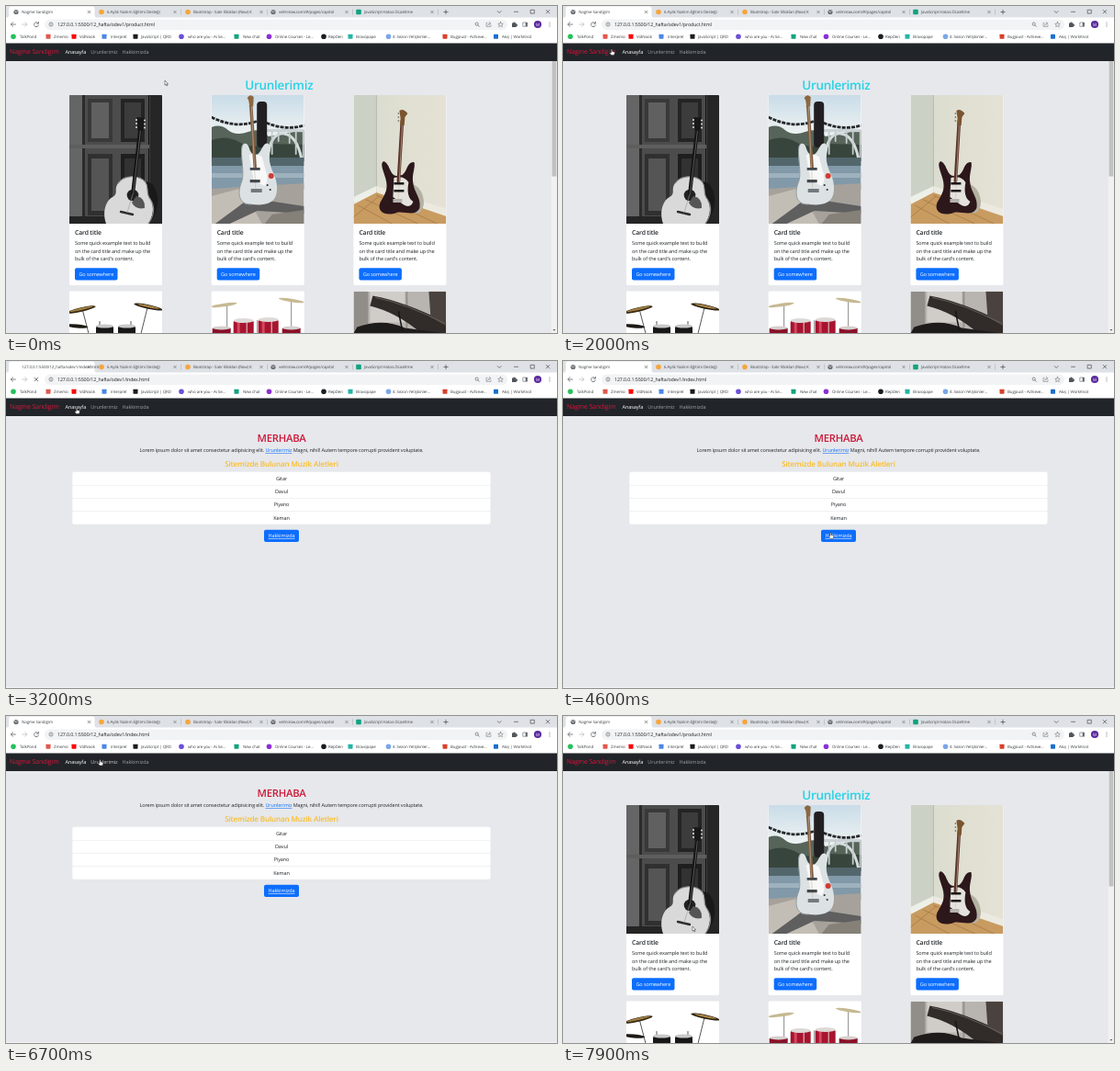
An HTML page that plays this animation: 600 by 356 pixels, repeating every 8 s.

```html
<!DOCTYPE html>
<html lang="tr">
<head>
<meta charset="utf-8">
<title>Nagme Sandigim</title>
<style>
  html, body { margin: 0; width: 100%; height: 100%; overflow: hidden; }
  svg.stage { display: block; width: 100vw; height: 100vh; }
  svg svg { overflow: visible; }
  text {
    font-family: "Open Sans", "Noto Sans", sans-serif;
    letter-spacing: -.02em;
    text-rendering: geometricPrecision;
    white-space: pre;
  }
</style>
</head>
<body>
<script>
const LOOP = 8000, STEP = 100;
const BLUE = '#0d6efd', INK = '#212529';

const rect = (x, y, w, h, fill, r = 0) =>
  `<rect x="${x}" y="${y}" width="${w}" height="${h}" fill="${fill}" rx="${r}"/>`;
const dot = (x, y, r, fill) => `<circle cx="${x}" cy="${y}" r="${r}" fill="${fill}"/>`;
const oval = (x, y, rx, ry, fill, turn = 0) =>
  `<ellipse cx="${x}" cy="${y}" rx="${rx}" ry="${ry}" fill="${fill}" transform="rotate(${turn} ${x} ${y})"/>`;
const shape = (d, fill) => `<path d="${d}" fill="${fill}"/>`;
const line = (d, color = '#5f6368', w = .7) =>
  `<path d="${d}" fill="none" stroke="${color}" stroke-width="${w}" stroke-linecap="round" stroke-linejoin="round"/>`;
const text = (x, y, size, str, fill = INK, more = '') =>
  `<text x="${x}" y="${y}" font-size="${size}" fill="${fill}" ${more}>${str}</text>`;
const group = (id, body) => `<g id="${id}">${body}</g>`;
const MID = 'text-anchor="middle"', BOLD = 'font-weight="600"';

const cross = (x, y, r, color, w) =>
  line(`M${x - r} ${y - r}L${x + r} ${y + r}M${x + r} ${y - r}L${x - r} ${y + r}`, color, w);
const globe = (x, y) => dot(x, y, 2.6, '#5f6368') +
  line(`M${x - 1.6} ${y - .9}l1.5 .5l.2 1.5M${x + .6} ${y - 1.7}l1.2 1.4`, '#fff', .6);

function browser() {
  const tabs = [
    [104, '6 Aylık Yazılım Eğitimi Desteği', dot(104, 6.5, 2.8, '#f6a63c')],
    [198, 'Bootstrap - Satır Blokları (Row) K', dot(198, 6.5, 2.8, '#f6a63c')],
    [291, 'velmirow.com/#/pages/capitol', globe(291, 6.5)],
    [384, 'JavaScript Hatası Düzeltme', rect(381.2, 3.7, 5.6, 5.6, '#10a37f', 1)],
  ];
  const marks = [
    [8, 15, 'TalkPond', '#25c15c'], [46, 52, 'Zmemo', '#e2574c', 1], [74, 80, 'VidNook', '#f00', 1],
    [107, 114, 'Interpret', '#4a86e8', 1], [141, 147, 'JavaScript | QRD', '#1b1b1b', 1],
    [191, 198, 'who are you - Ai Se...', '#6c4fd8'], [251, 258, 'New chat', '#10a37f', 1],
    [286.5, 293, 'Online Courses - Le...', '#8b2fd6'], [346, 351, 'RepDen', '#1b1f23'],
    [375, 381, 'Bravopape', '#24b5a5', 1], [416.5, 421, '4. Sezon Yetişkinler...', '#7aa7e8'],
    [478, 484, 'Bugjoust - Achieve...', '#d8402b', 1], [533.5, 540, 'Akış | WorkKnot', '#1a6fd0', 1],
  ];
  let s = rect(0, 0, 600, 13, '#dee1e6') +
    shape('M1 13Q3 12.5 3 10V3Q3 .5 5.5 .5H94Q96.5 .5 96.5 3V10Q96.5 12.5 98.5 13Z', '#fff') +
    rect(0, 12.5, 600, 28, '#fff') + rect(42, 14.5, 504, 11.5, '#f1f3f4', 5.7);
  s += group('favicon', globe(11, 6.5)) + text(17, 8.4, 4.45, '', '#3c4043', 'id="tabTitle"') +
    cross(90.5, 6.5, 1.3, '#45494d', .6);
  for (const [x, title, icon] of tabs)
    s += icon + text(x + 6, 8.4, 4.45, title, '#45494d') +
      cross(x + 80, 6.5, 1.3, '#5f6368', .6) + rect(x + 86, 3.5, .5, 6, '#a4a8ad');
  s += line('M476.8 6.5h4.4M479 4.3v4.4', '#45494d') +
    line('M535.3 5.6l1.9 1.9l1.9-1.9M553.5 6.3h4', '#333', .6) +
    line('M571.5 4.3h3.8v3.8h-3.8z', '#333', .6) + cross(590, 6.2, 1.8, '#333', .6);

  s += line('M10.4 20h-5M7.6 17.8L5.3 20l2.3 2.2', '#5f6368', .8) +
    line('M17.8 20h5M20.6 17.8l2.3 2.2l-2.3 2.2', '#bcc0c4', .8) +
    group('reload', line('M35.2 18.8A2.5 2.5 0 1 0 35.5 20.9M35.4 17.2v1.9h-1.9', '#5f6368', .8)) +
    group('stop', cross(33, 20, 1.9, '#5f6368', .8)) +
    `<circle cx="49" cy="20" r="2.1" fill="none" stroke="#5f6368" stroke-width=".6"/>` +
    line('M49 19.9v1M49 18.9v.05', '#5f6368', .6) +
    text(56, 22, 5.3, '', '#202124', 'id="url"');
  s += `<circle cx="512.7" cy="19.6" r="1.6" fill="none" stroke="#5f6368" stroke-width=".7"/>` +
    line('M514 20.9l1.4 1.4') +
    line('M524 18.3h-1v4h5v-1.5M524.5 21q.4-2.2 3-2.2M526.2 17.3l1.5 1.5l-1.5 1.5', '#5f6368', .5) +
    line('M538.5 17.3l.8 1.9l2 .2l-1.5 1.3l.5 2l-1.8-1.1l-1.8 1.1l.5-2l-1.5-1.3l2-.2z', '#5f6368', .5) +
    shape('M551 18.4h1.4a1 1 0 1 1 2 0h1.3v1.5a1 1 0 1 1 0 1.9v1.2h-4.7z', '#50555a') +
    line('M563.2 18h4.4v4.2h-4.4z', '#5f6368', .6) + rect(565.7, 18, 1.9, 4.2, '#5f6368') +
    dot(579, 20, 4.1, '#5b2a9d') + text(579, 21.6, 4.4, 'M', '#fff', MID) +
    [18, 20, 22].map(y => dot(592, y, .55, '#5f6368')).join('');

  for (const [ix, tx, label, color, square] of marks)
    s += (square ? rect(ix - 2.5, 30.7, 5, 5, color, .6) : dot(ix, 33.2, 2.8, color)) +
      text(tx, 34.9, 4.45, label, '#3c4043');
  return s;
}

function navbar() {
  return rect(0, 40, 600, 20, INK) + text(4, 52.4, 7, 'Nagme Sandigim', '#dc143c') +
    text(64.5, 52, 5.55, 'Anasayfa', '#fff') +
    text(92.3, 52, 5.55, 'Urunlerimiz', '#9b9d9f', 'id="shopLink"') +
    text(126.5, 52, 5.55, 'Hakkimizda', '#9b9d9f');
}

// Pictures are drawn in a 101 x 140 box.
const acoustic = () =>
  rect(0, 0, 101, 140, '#4c4c4c') + rect(0, 0, 14, 140, '#656565') + rect(14, 0, 3, 140, '#2b2b2b') +
  rect(20, 4, 27, 47, '#393939') + rect(24, 8, 19, 39, '#606060') +
  rect(56, 4, 26, 47, '#242424') + rect(60, 8, 18, 39, '#3c3c3c') +
  rect(20, 64, 27, 67, '#303030') + rect(24, 69, 19, 57, '#555') +
  rect(56, 64, 26, 76, '#1e1e1e') + rect(60, 69, 18, 66, '#323232') +
  rect(88, 0, 13, 140, '#262626') + rect(86, 0, 1.2, 140, '#111') + rect(0, 54, 87, 4, '#5e5e5e') +
  rect(0, 132, 101, 8, '#252525') + oval(81, 118, 15, 24, '#191919', 8) +
  shape('M53 96C60 86 77 87 83 95C87 101 83 107 88 113C95 124 88 139 83 144H42C35 132 38 116 47 111C54 107 48 103 53 96Z', '#d9d9d9') +
  line('M53 96C60 86 77 87 83 95C87 101 83 107 88 113C95 124 91 133 86 140', '#858585', 1.1) +
  dot(69, 109, 6.3, '#212121') + shape('M73 110q10 2 9 13q-10 2-14-6z', '#555') +
  line('M77 38L69 108', '#151515', 4) + line('M77.5 38L69.5 108', '#747474', .7) +
  shape('M73.5 24l8.5 .6l-2 14.5l-5.5-.4z', '#181818') +
  [27, 31, 35].map(y => dot(73, y, 1, '#ddd') + dot(82, y + .5, 1, '#ddd')).join('') +
  line('M56 127l13 3', '#2d2d2d', 2.4) + line('M69 108L63 128', '#999', .6);

const electric = () =>
  rect(0, 0, 101, 70, 'url(#sky)') +
  shape('M0 35Q10 31 18 38T40 40T62 45L101 38V72H0Z', '#56645a') +
  shape('M0 49Q16 43 30 51T64 53L101 54V72H0Z', '#37453c') +
  rect(58, 37, 43, 3.2, '#c9d1d4') + line('M61 68Q65 40 79 42T98 69', '#d5dcdd', 3) +
  line('M66 40v24M73 40v10M85 40v12M92 40v24M100 40v28', '#c4cccd', 1.8) +
  rect(0, 68, 101, 35, '#8199a8') + rect(0, 68, 101, 9, '#52666c') + rect(0, 85, 101, 5, '#9eb2be') +
  shape('M0 102L101 96V140H0Z', '#a6a29b') + shape('M0 110L34 101L55 140H0Z', '#c3beb5') +
  shape('M42 112L101 121V129L50 126L20 140H4Z', '#5f5f60') + shape('M66 130L101 125V140H58Z', '#858078') +
  `<path d="M0 24Q28 38 53 27Q78 40 101 33" fill="none" stroke="#26282b" stroke-width="2.8" stroke-dasharray="4 1.2"/>` +
  rect(49.5, 7, 11, 50, '#211f21', 4) +
  shape('M35 53C42 51 40 61 45 64L49 65C55 63 56 50 62 53C67 57 61 66 64 75C66 85 73 91 71 106C69 120 55 120 44 119C29 120 28 106 33 94C37 83 29 57 35 53Z', '#dce2e4') +
  line('M35 53C29 57 37 83 33 94C28 106 29 120 44 119', '#8f989c', 1) +
  shape('M41 65q8-2 14 2l4 15q4 10-1 17l-12-6z', '#f7f8f7') +
  line('M43 11L47.5 79', '#805d40', 3.5) + line('M43.5 11L48 101', '#c9bda9', .6) +
  shape('M39 3q3-5 7-1l-.5 10l-4.5 1q1-6-2-10z', '#8d673f') + rect(42, 79, 11, 2.8, '#44494c') +
  rect(42, 92, 11, 3.2, '#44494c') + rect(43, 102, 12, 4, '#737a7d') +
  dot(65, 88, 3, '#d13b32') + dot(61, 98, 1.1, '#333') + dot(64, 103, 1.1, '#333');

const wallGuitar = () =>
  rect(0, 0, 101, 140, 'url(#wall)') + shape('M0 0H25V104L0 116Z', '#cbd1c5') + rect(24.5, 0, .8, 104, '#aeb5a7') +
  shape('M0 116L25 104L101 131V140H0Z', '#c89b61') +
  shape('M0 111L25 99V106L0 119Z', '#edf0e9') + shape('M25 99L101 124V132L25 106Z', '#eceae0') +
  line('M5 120L42 140M14 114L70 140M25 109L91 140M0 133L28 110', '#99703f', .6) +
  oval(66, 113, 10, 16, '#b4b1a1', -15) +
  shape('M33 72C40 75 39 87 47 88L53 87C59 83 58 72 66 73C68 78 63 87 65 96C66 106 74 112 72 123C67 133 55 126 47 128C36 132 25 128 29 117C35 107 38 102 35 91C33 83 28 74 33 72Z', '#2c171b') +
  shape('M44 90Q55 87 60 95Q57 111 65 116Q62 124 54 119L43 111Z', '#e4e2dd') +
  line('M53 28L49 94', '#5b3428', 3.7) + line('M53.2 28L49 112', '#d0c4af', .6) +
  shape('M50 17q4-3 9 3l-3 4l-.7 9l-4.4-.3q1-8-.9-15.7z', '#7b532f') +
  rect(44, 95, 11, 2.5, '#171717') + rect(44, 103, 11, 2.5, '#171717') + rect(43, 113, 10, 4, '#b5b3af') +
  [20, 24, 28].map(y => dot(49, y, .9, '#82817b')).join('');

const blackDrums = () =>
  rect(0, 0, 101, 140, '#fff') + line('M14 19L21 46M85 18L78 46M33 33v13M67 33v13', '#555', 1) +
  oval(13, 20, 16, 2.4, '#382a15', -13) + oval(13, 19.4, 13, 1.1, '#a38242', -13) +
  oval(86, 17, 16, 2.4, '#2c2114', 12) + oval(86, 16.5, 12, 1, '#b18c48', 12) +
  oval(8, 38, 12, 2, '#1d1a16', 5) + rect(29, 38, 19, 10, '#171717', 2) + rect(53, 38, 19, 10, '#171717', 2) +
  oval(38.5, 38, 9.5, 2, '#c9c9c9') + oval(62.5, 38, 9.5, 2, '#c9c9c9');

const redDrums = () =>
  rect(0, 0, 101, 140, '#fff') + line('M17 15v31M87 10v36M50 32v14', '#888', 1) +
  oval(14, 15, 14, 1.8, '#c6b992', -8) + oval(87, 10, 14, 1.8, '#c6b992', 9) +
  [[24, 32], [51, 31]].map(([x, y]) => rect(x, y, 22, 16, '#a8142f', 2) + rect(x + 4, y, 3, 16, '#d34860') +
    rect(x + 14, y, 1, 16, '#e4d4d4') + oval(x + 11, y, 11, 2.5, '#ded9d7')).join('') +
  rect(1, 40, 20, 9, '#8b1028', 1) + rect(77, 40, 20, 9, '#8b1028', 1) +
  oval(11, 40, 10, 1.9, '#d5d0ce') + oval(87, 40, 10, 1.9, '#d5d0ce');

const piano = () =>
  rect(0, 0, 101, 140, '#b8b4af') + rect(0, 0, 16, 46, '#918d89') + rect(18, 0, 38, 34, '#d0cdc9') +
  rect(57, 0, 2, 40, '#969089') + shape('M21 5Q55 11 101 34V46H74Q47 23 18 16Z', '#312b29') +
  shape('M82 0H101V38L84 28Z', '#4a423e') + shape('M4 39Q32 29 56 40L101 46H0Z', '#1e1b1b') +
  line('M49 22L53 42', '#171515', 1.5) + line('M24 7Q56 13 99 35', '#77706b', .7);

function card(x, y, picture) {
  const copy = ['Some quick example text to build', 'on the card title and make up the', "bulk of the card's content."];
  return `<svg x="${x}" y="${y}">` + rect(0, 0, 101, 207, '#fff', 1.4) +
    `<g clip-path="url(#photo)">${picture()}</g>` +
    text(6, 152.4, 6.8, 'Card title', INK, BOLD) +
    copy.map((s, i) => text(6, 163.4 + i * 8.5, 5.55, s)).join('') +
    rect(6, 188.3, 46.5, 13.3, BLUE, 2) + text(29.3, 196.9, 5.55, 'Go somewhere', '#fff', MID) + '</svg>';
}

function shopPage() {
  const rows = [[97, [acoustic, electric, wallGuitar]], [310.5, [blackDrums, redDrums, piano]]];
  return text(297.3, 91, 13.5, 'Urunlerimiz', '#25d2e6', MID + ' ' + BOLD) +
    rows.map(([y, pics]) => pics.map((pic, i) => card(69 + i * 154.7, y, pic)).join('')).join('') +
    rect(593.7, 40, 6.3, 316, '#f1f1f1') + rect(594.5, 46, 4.8, 139.5, '#c1c1c1') +
    shape('M595.5 44l1.4-1.8l1.4 1.8z', '#777') + shape('M595.5 352l1.4 1.8l1.4-1.8z', '#555');
}

function homePage() {
  return text(300, 88.4, 11.3, 'MERHABA', '#cb1837', MID + ' ' + BOLD) +
    text(300, 99.4, 5.5, `Lorem ipsum dolor sit amet consectetur adipisicing elit. <tspan fill="${BLUE}" text-decoration="underline">Urunlerimiz</tspan> Magni, nihil! Autem tempore corrupti provident voluptate.`, INK, MID) +
    text(300, 115.4, 8.1, 'Sitemizde Bulunan Muzik Aletleri', '#f9bd28', MID + ' ' + BOLD) +
    rect(72.3, 120.8, 455.2, 57, '#fff', 2) +
    ['Gitar', 'Davul', 'Piyano', 'Keman'].map((s, i) =>
      (i ? rect(72.3, 120.7 + i * 14.25, 455.2, .4, '#dcdde0') : '') +
      text(300, 129.8 + i * 14.25, 5.55, s, INK, MID)).join('') +
    rect(281, 183.8, 38, 13.2, BLUE, 2) +
    text(300, 192.3, 5.55, 'Hakkimizda', '#fff', MID + ' text-decoration="underline"') +
    rect(0, 355.2, 600, .8, '#f7f7f9');
}

const outlined = d => `<path d="${d}" fill="#fff" stroke="#111" stroke-width=".45"/>`;
const cursors =
  group('arrow', outlined('M0 0V5.2L1.2 4.1L2 6L2.8 5.6L2 3.8H3.6Z')) +
  group('hand', outlined('M-.6 .3Q0-.5 .6 .3V2.4L2.7 2.9Q3.5 3.2 3.3 4.2L2.7 6.4H-.6L-2.1 4.2Q-2 3.2-.6 4Z')) +
  group('beam', line('M-1 0h2M0 0v5.4M-1 5.4h2', '#222', .55));

document.body.innerHTML = `<svg class="stage" viewBox="0 0 600 356" preserveAspectRatio="none">
  <defs>
    <clipPath id="photo"><path d="M0 140V1.4Q0 0 1.4 0H99.6Q101 0 101 1.4V140Z"/></clipPath>
    <linearGradient id="sky" x2="0" y2="1"><stop stop-color="#c9dce8"/><stop offset=".6" stop-color="#eef2f2"/></linearGradient>
    <linearGradient id="wall"><stop stop-color="#d8dbce"/><stop offset="1" stop-color="#e5e2d5"/></linearGradient>
  </defs>
  ${rect(0, 0, 600, 356, '#e7e8ec')}
  ${group('shop', shopPage())}${group('home', homePage())}${navbar()}${browser()}
  <svg id="cursor">${cursors}</svg></svg>`;

// time, x, y of the pointer tip
const path = [
  [0, 173, 81], [500, 173, 81], [800, 215, 58], [1100, 269.5, 21], [1400, 205, 24], [1700, 112, 38],
  [2000, 53, 47], [2200, 53, 47], [2900, 77, 51], [3700, 77, 51], [4000, 190, 122], [4300, 291, 187],
  [4600, 291.5, 187], [4800, 303, 190], [5200, 303, 190], [5400, 102.5, 47.5], [7200, 102.5, 47.5],
  [7400, 112, 74], [7500, 112, 74], [7900, 141, 229], [LOOP, 141, 229],
];
const links = [[4, 45, 56, 55], [64, 46, 88, 55], [92, 46, 122, 55], [127, 46, 156, 55]];
const button = [281, 183, 319, 197];

const el = id => document.getElementById(id);
const show = (id, on) => { el(id).style.display = on ? '' : 'none'; };
const within = (x, y, [l, t, r, b]) => x >= l && x <= r && y >= t && y <= b;

function pointer(t) {
  const i = path.findIndex(p => p[0] > t);
  const [t0, x0, y0] = path[i - 1], [t1, x1, y1] = path[i];
  const k = (t - t0) / (t1 - t0);
  return [x0 + (x1 - x0) * k, y0 + (y1 - y0) * k];
}

function render(t) {
  const home = t >= 3100 && t < 6800;
  const loading = (t >= 3100 && t < 3300) || (t >= 6800 && t < 7000);
  const url = `127.0.0.1:5500/12_hafta/odev1/${home ? 'index' : 'product'}.html`;
  const [x, y] = pointer(t);
  const hand = links.some(box => within(x, y, box)) || (home && within(x, y, button));
  const beam = within(x, y, [42, 12, 508, 26]);

  show('home', home);
  show('shop', !home);
  show('favicon', !loading);
  show('reload', !loading);
  show('stop', loading);
  show('hand', hand);
  show('beam', beam);
  show('arrow', !hand && !beam);
  el('url').textContent = url;
  el('tabTitle').textContent = loading ? url.slice(0, 40) : 'Nagme Sandigim';
  el('shopLink').setAttribute('fill', within(x, y, links[2]) ? '#c8c9ca' : '#9b9d9f');
  el('cursor').setAttribute('x', x);
  el('cursor').setAttribute('y', y);
}

const start = performance.now();
function tick() {
  const t = (performance.now() - start) % LOOP;
  render(Math.floor(t / STEP) * STEP);
  requestAnimationFrame(tick);
}
tick();
</script>
</body>
</html>
```
